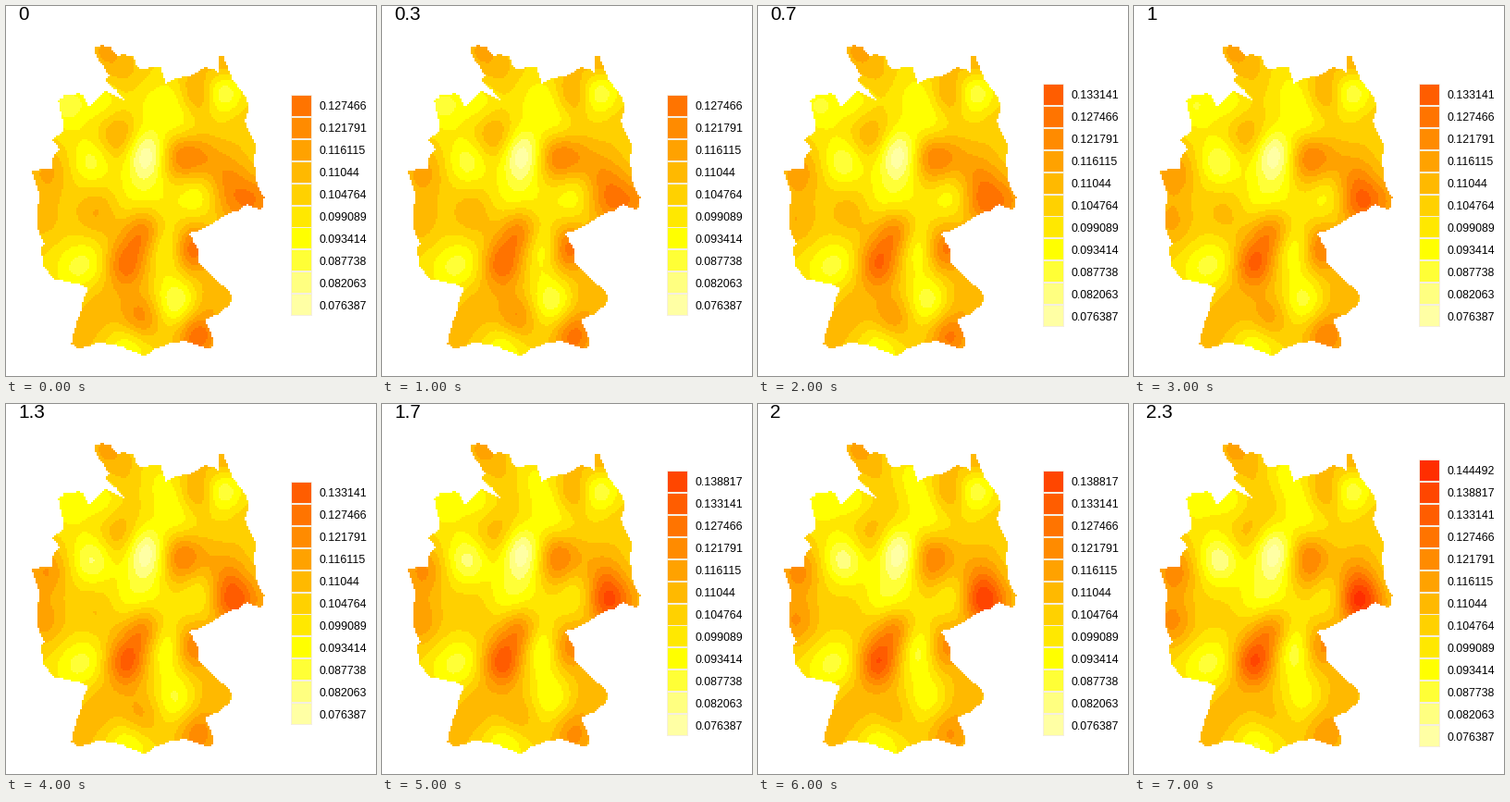
Animation, 400 px wide and 400 px high, one loop 8000 ms. Source, as a matplotlib script:

```python
import numpy as np
import matplotlib.pyplot as plt
from matplotlib.animation import FuncAnimation
from matplotlib.patches import Rectangle
from matplotlib.path import Path

SIZE, DPI, CELL, STEPS = 400, 100, 2, 8
LOWEST, STEP = 0.0763874, 0.0056754
MEAN_LEVEL = 4.6

# Corners of the country, clockwise from the north-west
OUTLINE = [(95, 44), (112, 44), (119, 53), (138, 55), (144, 68), (169, 66),
           (172, 84), (196, 76), (215, 66), (229, 71), (230, 54), (236, 54),
           (243, 75), (256, 94), (262, 105), (258, 124), (270, 151),
           (267, 165), (271, 190), (279, 207), (276, 221), (261, 214),
           (240, 225), (206, 244), (198, 246), (208, 265), (207, 275),
           (228, 298), (245, 314), (242, 323), (229, 333), (215, 339),
           (225, 362), (222, 370), (192, 362), (165, 369), (147, 378),
           (128, 369), (105, 363), (78, 371), (71, 365), (80, 335),
           (89, 306), (65, 297), (52, 296), (40, 282), (37, 262), (42, 258),
           (33, 222), (37, 210), (27, 178), (50, 177), (50, 166), (59, 155),
           (50, 145), (61, 137), (57, 103), (63, 97), (79, 94), (90, 110),
           (107, 91), (127, 101), (119, 90), (106, 80), (112, 76),
           (102, 61)]

# Hot and cool spots at the start: x, y, level
SPOTS = [(107, 48, 6.8), (128, 74, 5.8), (66, 108, 1.9), (106, 103, 3),
         (148, 105, 3.5), (122, 140, 6.5), (180, 100, 3), (208, 95, 6.3),
         (233, 90, 2.2), (236, 65, 6), (256, 127, 5.2), (190, 130, 3.6),
         (93, 168, 2.2), (152, 158, 0), (150, 182, 1), (188, 162, 8.2),
         (213, 164, 7.8), (241, 182, 7.8), (243, 213, 8), (270, 210, 8.6),
         (206, 205, 3), (165, 213, 3.7), (135, 213, 3.8), (98, 223, 6.6),
         (45, 180, 6.8), (40, 230, 6), (70, 285, 2.4), (92, 277, 2.6),
         (129, 280, 9.4), (149, 245, 8.3), (176, 260, 3.7), (199, 262, 9),
         (102, 326, 6.3), (145, 338, 7.8), (184, 320, 1.6), (226, 313, 6.3),
         (207, 357, 9.4), (134, 366, 3), (80, 356, 6)]

# Places that warm or cool over the loop: x, y, change of level
DRIFT = [(157, 76, -1), (146, 105, 1.5), (67, 108, 1.2), (122, 140, -0.9),
         (93, 168, -1.5), (213, 163, -1.6), (243, 214, 4.2),
         (272, 208, -1.8), (190, 192, 1.8), (98, 222, -1.9),
         (42, 182, 1.5), (42, 238, 2.1), (136, 215, -1.2),
         (129, 280, 1.5), (174, 278, -1.4), (199, 262, -1.6),
         (145, 337, -2.2), (185, 322, 1.4), (207, 357, -2)]


def roughen(points, passes=2, amount=0.09):
    """Split every edge and push its middle sideways at random."""
    rng = np.random.default_rng(4)
    points = np.array(points, float)
    for _ in range(passes):
        edge = np.roll(points, -1, axis=0) - points
        normal = edge[:, ::-1] * (1, -1)
        push = rng.uniform(-amount, amount, (len(points), 1))
        middle = points + edge / 2 + normal * push
        points = np.stack([points, middle], axis=1).reshape(-1, 2)
    return points


def kernel(x, y, px, py):
    dx = (x[:, None] - px) / 16
    dy = (y[:, None] - py) / 19
    return np.exp(-(dx ** 2 + dy ** 2) / 2)


def surface(x, y, spots, mean=0):
    """Smooth surface through the spots that settles at the mean."""
    px, py, value = np.array(spots).T
    gram = kernel(px, py, px, py) + 0.03 * np.eye(len(px))
    return mean + kernel(x, y, px, py) @ np.linalg.solve(gram, value - mean)


pale = [(1, 1, b / 255) for b in (164, 128, 54)]
warm = [(1, 1 - i / 11, 0) for i in range(10)]
COLORS = np.array(pale + warm)

n = SIZE // CELL
axis = (np.arange(n) + 0.5) * CELL
gx, gy = (g.ravel() for g in np.meshgrid(axis, axis))
land = Path(roughen(OUTLINE)).contains_points(np.c_[gx, gy])
start = surface(gx[land], gy[land], SPOTS, MEAN_LEVEL)
drift = surface(gx[land], gy[land], DRIFT)

fig = plt.figure(figsize=(SIZE / DPI, SIZE / DPI), dpi=DPI, facecolor="white")
ax = fig.add_axes([0, 0, 1, 1])
ax.axis("off")
image = ax.imshow(np.ones((n, n, 3)), extent=(0, SIZE, SIZE, 0),
                  interpolation="nearest")
ax.set_xlim(0, SIZE)
ax.set_ylim(SIZE, 0)


def add_text(x, y, px, content=""):
    return ax.text(x, y, content, fontsize=px * 72 / DPI, va="baseline",
                   family="Liberation Sans", color="black")


def add_box(x, width, height, color):
    return ax.add_patch(Rectangle((x, 0), width, height, fc=color, lw=0))


title = add_text(13.2, 15, 20.8)
keys = []
for i, color in enumerate(COLORS):
    value = f"{LOWEST + i * STEP:.6f}".rstrip("0")
    keys.append((add_box(308, 23, 24, "#f4eee0"),
                 add_box(309, 21, 22, color),
                 add_text(338.5, 0, 12.4, value)))


def draw_legend(count):
    pitch = 23.95
    bottom = 215.5 + count * pitch / 2
    for i, (frame, swatch, label) in enumerate(keys):
        top = bottom - (i + 1) * pitch
        frame.set_y(round(top))
        swatch.set_y(round(top) + 1)
        label.set_y(top + pitch / 2 + 4.3)
        for part in (frame, swatch, label):
            part.set_visible(i < count)


def update(k):
    count = 10 + (2 * k + 1) // 5
    level = np.rint(start + drift * k / (STEPS - 1)).astype(int)
    rgb = np.ones((n * n, 3))
    rgb[land] = COLORS[np.clip(level, 0, count - 1)]
    image.set_data(rgb.reshape(n, n, 3))
    title.set_text(f"{round(k / 3, 1):g}")
    draw_legend(count)
    return []


anim = FuncAnimation(fig, update, frames=STEPS, interval=1000,
                     init_func=lambda: update(0), repeat=True, repeat_delay=0)
plt.show()
```
